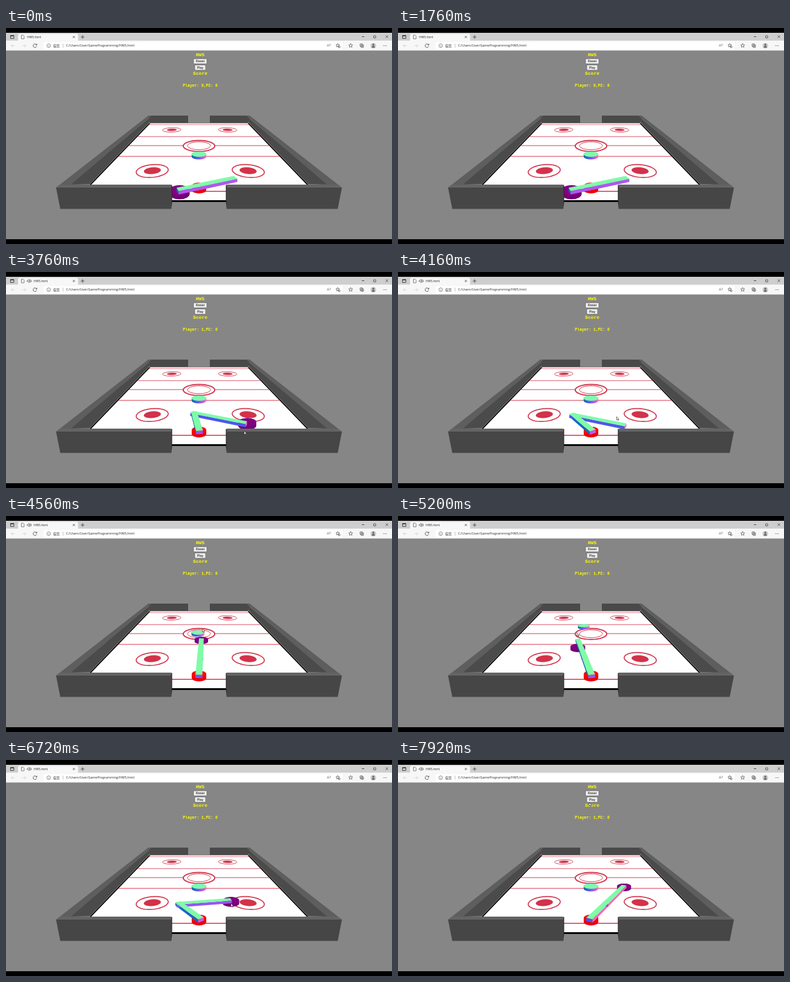
Recreate the animation shown at these times as an HTML page with a canvas. Size 640 px wide and 360 px high, loop 8000 ms.

```html
<!DOCTYPE html>
<html>
<head>
<meta charset="utf-8">
<title>HW5</title>
<style>
  html, body { margin: 0; width: 100%; height: 100%; overflow: hidden; background: #000; }
  canvas { display: block; }
</style>
</head>
<body>
<canvas id="stage" width="640" height="360"></canvas>
<script>
const ctx = document.getElementById('stage').getContext('2d');
const LOOP = 8000, RED = '#d3324a', TOP = '#80fba8';
const HORIZON = 75, FOCAL = 370, HALF = 0.96, NEAR = 1.745, FAR = 4.4;
const BASE_Z = 1.9, L1 = 0.33, L2 = 0.52;
const REST_Z = 2.652, RUN = 1.65;
const PLAY = 3280, LEAVE = 7200, LAG = 80;

// Pointer stops: ms, x, y.
const stops = [
  [2800, 640, 345], [3120, 338, 253], [3360, 322, 205], [3600, 400, 256], [3960, 388, 278],
  [4420, 325, 187], [4540, 326, 187], [4840, 299, 242], [5400, 296, 175],
  [6540, 373, 239], [6740, 373, 239], [LEAVE, 403, 186], [7520, 380, 103], [7900, 317, 71]
];
const shots = [
  { from: 3320, to: 3600, speed: .0059, drift: 0 },
  { from: 4460, to: 6400, speed: .00354, drift: -.000146 }
];

function pointer(t) {
  const i = stops.findIndex(s => s[0] > t);
  if (i < 1) return stops[i ? stops.length - 1 : 0].slice(1);
  const [t0, x0, y0] = stops[i - 1], [t1, x1, y1] = stops[i];
  const f = (t - t0) / (t1 - t0), e = f * f * (3 - 2 * f);
  return [x0 + (x1 - x0) * e, y0 + (y1 - y0) * e];
}

// Ground point to screen; depth is the distance from the eye.
function project(x, z, h = 0) {
  const w = FOCAL / z;
  return [320 + x * w, HORIZON + w * (1 - h)];
}

// Ground point under the pointer, relative to the arm base and within reach.
function target(t, min) {
  let x = -.16, z = -.066;
  if (t >= PLAY - LAG) {
    const [px, py] = pointer(Math.min(t, LEAVE)), w = py - HORIZON;
    x = (px - 320) / w;
    z = FOCAL / w - BASE_Z;
  }
  const d = Math.hypot(x, z), k = Math.min(L1 + L2, Math.max(min, d)) / d;
  return [x * k, z * k];
}

// The puck runs up and down the table from its rest point.
function puck(t) {
  const shot = shots.find(s => t >= s.from && t < s.to);
  if (!shot) return [0, REST_Z];
  const dt = t - shot.from;
  return [shot.drift * dt, REST_Z + RUN - Math.abs(RUN - shot.speed * dt % (2 * RUN))];
}

// Colour of a vertical face from its normal; c points to the viewer.
const normalColor = (nx, c) =>
  `rgb(${[nx, -.34 * c, .94 * c].map(v => Math.round(127.5 + 127.5 * v))})`;

function poly(points, fill, stroke, width = .7) {
  ctx.beginPath();
  points.forEach(p => ctx.lineTo(...p));
  ctx.closePath();
  if (fill) { ctx.fillStyle = fill; ctx.fill(); }
  if (stroke) { ctx.strokeStyle = stroke; ctx.lineWidth = width; ctx.stroke(); }
}

function rect(x, y, w, h, fill, radius = 0, stroke) {
  ctx.beginPath();
  ctx.roundRect(x, y, w, h, radius);
  if (fill) { ctx.fillStyle = fill; ctx.fill(); }
  if (stroke) { ctx.strokeStyle = stroke; ctx.lineWidth = .8; ctx.stroke(); }
}

function line(color, width, ...points) {
  ctx.beginPath();
  points.forEach(p => ctx.lineTo(...p));
  ctx.strokeStyle = color;
  ctx.lineWidth = width;
  ctx.stroke();
}

function arc(x, y, r, color, from = 0, to = 2 * Math.PI) {
  ctx.beginPath();
  ctx.arc(x, y, r, from, to);
  ctx.strokeStyle = color;
  ctx.lineWidth = .8;
  ctx.stroke();
}

function dot(x, y, r, color, from = 0, to = 2 * Math.PI) {
  ctx.beginPath();
  ctx.arc(x, y, r, from, to);
  ctx.fillStyle = color;
  ctx.fill();
}

function text(s, x, y, font, color, align = 'left') {
  ctx.font = font;
  ctx.fillStyle = color;
  ctx.textAlign = align;
  ctx.textBaseline = 'middle';
  ctx.fillText(s, x, y);
}

function cross(x, y, r) {
  line('#333', .8, [x - r, y - r], [x + r, y + r]);
  line('#333', .8, [x - r, y + r], [x + r, y - r]);
}

function plus(x, y, r, color) {
  line(color, .8, [x - r, y], [x + r, y]);
  line(color, .8, [x, y - r], [x, y + r]);
}

function star(x, y, r) {
  poly(Array.from({ length: 10 }, (_, i) => {
    const a = i * Math.PI / 5 - Math.PI / 2, q = i % 2 ? r * .45 : r;
    return [x + q * Math.cos(a), y + q * Math.sin(a)];
  }), null, '#444');
}

function browser(audio) {
  const ink = '#444', ui = '"Open Sans", sans-serif';
  rect(0, 8, 640, 13, '#cecece');
  rect(0, 21, 640, 16.5, '#f7f7f7');
  rect(20, 9.5, 99.5, 12, '#f7f7f7', [3, 3, 0, 0]);
  rect(62, 23.5, 496, 12, '#fff', 3);

  rect(7.5, 12.5, 5.5, 5, null, 0, '#222');
  line('#222', 1.2, [7.5, 13], [13, 13]);
  poly([[25.5, 12], [28.5, 12], [30, 13.5], [30, 18], [25.5, 18]], '#fff', ink);
  if (audio) {
    poly([[35, 14], [36.5, 14], [38.5, 12.2], [38.5, 17.8], [36.5, 16], [35, 16]], null, ink);
    arc(38.5, 15, 1.8, ink, -.9, .9);
    arc(38.5, 15, 3.3, ink, -.9, .9);
  }
  text('HW5.html', audio ? 46 : 35, 15.4, '5px ' + ui, '#222');
  cross(112.5, 15, 1.7);
  plus(127, 15, 3, '#333');
  line('#222', .8, [590, 14.5], [594, 14.5]);
  rect(609.5, 13, 3.6, 3.6, null, .8, '#333');
  cross(631.5, 14.5, 2);

  for (const [x, d] of [[11.5, -1], [30, 1]]) {
    line('#d0d0d0', .8, [x - 3, 29.5], [x + 3, 29.5]);
    line('#d0d0d0', .8, [x + d * .5, 27], [x + d * 3, 29.5], [x + d * .5, 32]);
  }
  arc(48, 29.5, 3, ink, .3, 5.4);
  poly([[51.5, 26], [51.5, 28.8], [48.8, 28.8]], ink);
  arc(70.8, 29.5, 3, '#666');
  line('#666', .7, [70.8, 29], [70.8, 31.2]);
  text('檔案', 78, 29.6, '5.6px "Noto Sans CJK TC", "Noto Sans CJK", sans-serif', '#555');
  line('#999', .6, [94.5, 26], [94.5, 33]);
  text('C:/Users/User/GameProgramming/HW5.html', 99.5, 29.7, '5.42px ' + ui, '#222');

  text('A', 532, 29.8, '6px ' + ui, '#555');
  arc(535.5, 28, 2, '#555', -1, 1);
  star(550, 29, 3.2);
  arc(552.5, 31.5, 1.5, ink);
  star(571.5, 29.3, 3.5);
  rect(587, 26.5, 4.2, 4.2, null, .5, ink);
  rect(588.6, 28.1, 4.2, 4.2, '#f7f7f7', .5, ink);
  plus(590.7, 30.2, 1.3, ink);
  dot(609, 29.5, 4.6, '#c9c9c9');
  dot(609, 28, 1.7, '#666');
  dot(609, 32.8, 2.7, '#666', Math.PI);
  for (let i = 0; i < 3; i++) dot(626 + 2.3 * i, 29.5, .6, '#333');
}

function button(label, y, w) {
  rect(322 - w / 2, y, w, 8.6, '#efefef', 1, '#6a6a6a');
  text(label, 322, y + 4.6, '5.5px "Liberation Sans", sans-serif', '#000', 'center');
}

function page(score) {
  const label = (s, y, size) =>
    text(s, 322, y, `bold ${size}px "Liberation Mono", monospace`, '#ff0', 'center');
  label('HW5', 45.2, 8);
  button('Reset', 51.2, 22);
  button('Play', 61.7, 18);
  label('Score', 76.4, 8);
  label(`Player: ${score},PC: 0`, 96.8, 6.4);
}

function spot(x, z, rx, rz, fill, stroke) {
  const points = Array.from({ length: 48 }, (_, i) => {
    const a = i * Math.PI / 24;
    return project(x + rx * Math.cos(a), z + rz * Math.sin(a));
  });
  poly(points, fill, stroke && RED, stroke * FOCAL / z);
}

function floor() {
  const quad = (x, h) => [project(-x, NEAR, h), project(x, NEAR, h), project(x, FAR), project(-x, FAR)];
  poly(quad(.985, -.014), '#000');
  poly(quad(HALF, 0), '#fff');
  for (const y of [161, 181, 196, 214, 272.3]) {
    const z = FOCAL / (y - HORIZON);
    line(RED, .008 * (y - HORIZON), project(-HALF, z), project(HALF, z));
  }
  spot(0, 3.06, .215, .23, '#fff', .016);
  spot(0, 3.06, .157, .165, '#fff', .008);
  for (const z of [2.275, 3.907]) for (const x of [-.475, .5]) {
    spot(x, z, .16, .15, '#fff', .01);
    spot(x, z, .085, .08, RED);
  }
}

// Draws a wall part and its mirror image.
function pair(fill, ...points) {
  poly(points, fill);
  poly(points.map(([x, y]) => [640 - x, y]), fill);
}

function farWalls() {
  pair('#494949', [236, 146], [302, 146], [302, 158], [238, 158]);
  pair('#4b4b4b', [241, 147], [237, 158], [139, 260], [106, 261]);
  pair('#5e5e5e', [236, 146], [241, 146.5], [107, 261.5], [83, 266]);
}

function nearWalls() {
  pair('#646464', [89, 261], [273.5, 261], [274, 266.5], [83, 266.5]);
  pair('#333', [273.5, 261], [275.5, 262], [275.5, 290], [274, 302]);
  pair('#464646', [83, 266], [274, 266], [274, 301.5], [90, 301.5]);
}

function disc(x, z, r, top, side) {
  const w = FOCAL / z, rx = r * w, ry = rx * .0026 * w;
  const [sx, sy] = project(x, z), ty = project(x, z, .03)[1];
  let fill = side;
  if (!fill) {
    fill = ctx.createLinearGradient(sx - rx, 0, sx + rx, 0);
    for (let n = -1; n <= 1; n += .25) fill.addColorStop((n + 1) / 2, normalColor(n, Math.sqrt(1 - n * n)));
  }
  ctx.fillStyle = fill;
  ctx.beginPath();
  ctx.ellipse(sx, sy, rx, ry, 0, 0, Math.PI);
  ctx.ellipse(sx, ty, rx, ry, 0, Math.PI, 2 * Math.PI);
  ctx.fill();
  ctx.fillStyle = top;
  ctx.beginPath();
  ctx.ellipse(sx, ty, rx, ry, 0, 0, 2 * Math.PI);
  ctx.fill();
}

function area(points) {
  return points.reduce((sum, [x, y], i) => {
    const [u, v] = points[(i + 1) % points.length];
    return sum + x * v - u * y;
  }, 0);
}

// Draws the sides of a box between two ground points and returns its top.
function link(a, b, tail, head) {
  const len = Math.hypot(b[0] - a[0], b[1] - a[1]), half = .029;
  const dx = (b[0] - a[0]) / len, dz = (b[1] - a[1]) / len;
  const corners = [[-tail, -half], [len + head, -half], [len + head, half], [-tail, half]]
    .map(([s, p]) => [a[0] + dx * s - dz * p, a[1] + dz * s + dx * p]);
  const normals = [[dz, -dx], [dx, dz], [-dz, dx], [-dx, -dz]];
  const upper = corners.map(([x, z]) => project(x, z, .042));
  const lower = corners.map(([x, z]) => project(x, z, .014));
  const facing = Math.sign(area(upper));
  normals.forEach(([nx, nz], i) => {
    const j = (i + 1) % 4, face = [upper[j], upper[i], lower[i], lower[j]];
    if (area(face) * facing > 0) poly(face, normalColor(nx, -nz));
  });
  return upper;
}

// Two-link inverse kinematics with the elbow on the left.
function arm(t) {
  const [x, z] = target(t, L2 - L1), d = Math.hypot(x, z);
  const along = (L1 * L1 - L2 * L2 + d * d) / (2 * d);
  const off = Math.sqrt(Math.max(0, L1 * L1 - along * along));
  const elbow = [(x * along - z * off) / d, BASE_Z + (z * along + x * off) / d];
  const tops = [link([0, BASE_Z], elbow, .03, .03), link(elbow, [x, BASE_Z + z], .03, 0)];
  tops.forEach(top => poly(top, TOP));
}

function cursor(t) {
  if (t < stops[0][0]) return;
  const [x, y] = pointer(t);
  const shape = [[0, 0], [0, 5.7], [1.3, 4.5], [2.2, 6.5], [3, 6.1], [2.2, 4.2], [4, 4.2]];
  poly(shape.map(([u, v]) => [x + u, y + v]), '#fff', '#222', .6);
}

function draw(t) {
  rect(0, 0, 640, 360, '#000');
  rect(0, 37, 640, 315, '#868686');
  browser(t >= shots[0].to + LAG);
  page(t >= shots[0].to ? 1 : 0);
  floor();
  farWalls();
  const [px, pz] = puck(t), [mx, mz] = target(t - 2 * LAG, 0);
  const discs = [
    [px, pz, .087, TOP],
    [mx, BASE_Z + mz, .083, '#800080', '#740076'],
    [0, BASE_Z, .062, '#fa0505', '#ee0008']
  ];
  discs.sort((a, b) => b[1] - a[1]).forEach(d => disc(...d));
  arm(t - LAG);
  nearWalls();
  cursor(t);
}

const start = performance.now();
function tick() {
  draw((performance.now() - start) % LOOP);
  requestAnimationFrame(tick);
}
tick();
</script>
</body>
</html>
```
